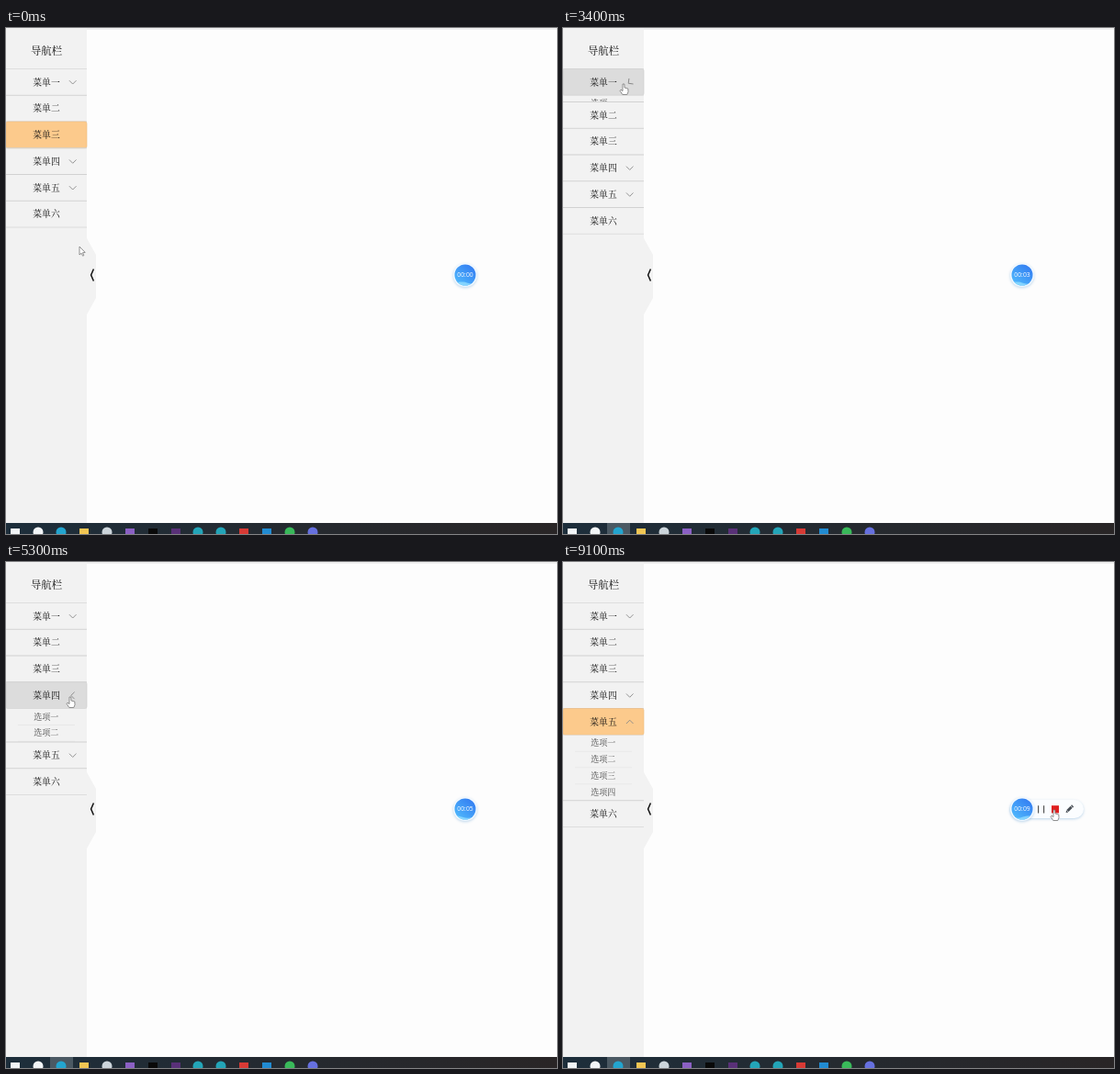
An HTML page with a canvas for the animation above (9.2 s loop, 600x551 px).

```html
<!DOCTYPE html>
<html lang="zh">
<head>
<meta charset="utf-8">
<style>
html, body { margin: 0; width: 100%; height: 100%; overflow: hidden; background: #fdfdfd; }
canvas { display: block; }
</style>
</head>
<body>
<canvas id="stage" width="600" height="551"></canvas>
<script>
const ctx = document.getElementById('stage').getContext('2d');
const LOOP = 9200, SLIDE = 300;
const SERIF = '"Noto Serif CJK SC", "Noto Serif SC", "Noto Sans CJK SC", serif';
const TOP = 44.5, ROW = 28.75, OPTION = 17.9, WIDTH = 88;
const DIGITS = '一二三四五六';

// Click times: [time, menu row]
const clicks = [[0, 2], [3313, 0], [4459, 1], [5150, 3], [6550, 4]];
const hasOptions = row => row === 0 || row === 3 || row === 4;

// Pointer path: [time, x, y]
const path = [
  [0, 80, 238], [700, 93, 264], [1150, 93, 266], [1950, 9.5, 265], [2330, 9.5, 265],
  [3200, 66, 61], [3650, 66, 61], [4350, 71, 171], [4650, 71, 171], [5080, 70, 147],
  [5350, 70, 147], [6000, 82.5, 227], [6120, 82.5, 227], [6420, 73, 246], [6750, 73, 246],
  [7100, 82, 236], [7220, 82, 236], [7500, 205, 234], [8000, 502, 266], [8500, 535, 270], [9200, 535, 270]
];

const clamp = v => Math.max(0, Math.min(1, v));
const ramp = (t, start, length = SLIDE) => clamp((t - start) / length);
const ease = p => p < .5 ? 4 * p ** 3 : 1 - 4 * (1 - p) ** 3;
const smooth = p => p * p * (3 - 2 * p);

function pointerAt(t) {
  const i = path.findIndex(k => k[0] > t);
  const [t0, x0, y0] = path[i - 1], [t1, x1, y1] = path[i];
  const p = smooth((t - t0) / (t1 - t0));
  return { x: x0 + (x1 - x0) * p, y: y0 + (y1 - y0) * p };
}

function rect(x, y, w, h, color, radius = 0) {
  ctx.fillStyle = color;
  ctx.beginPath();
  ctx.roundRect(x, y, w, h, radius);
  ctx.fill();
}

function disc(x, y, r, color) {
  ctx.fillStyle = color;
  ctx.beginPath();
  ctx.arc(x, y, r, 0, 7);
  ctx.fill();
}

function shape(points, fill, stroke, width = 1) {
  ctx.beginPath();
  points.forEach(([x, y]) => ctx.lineTo(x, y));
  if (fill) {
    ctx.closePath();
    ctx.fillStyle = fill;
    ctx.fill();
  }
  if (stroke) {
    ctx.strokeStyle = stroke;
    ctx.lineWidth = width;
    ctx.stroke();
  }
}

function label(text, x, y, size, color = '#111', family = SERIF) {
  ctx.font = `${size}px ${family}`;
  ctx.fillStyle = color;
  ctx.fillText(text, x, y);
}

function chevron(y, turn) {
  ctx.save();
  ctx.translate(72.7, y);
  ctx.rotate(turn * Math.PI);
  shape([[-3.8, -1.9], [0, 1.9], [3.8, -1.9]], null, '#888', .9);
  ctx.restore();
}

// How far a row's options have unfolded, linear 0..1
function unfolded(row, t) {
  const i = clicks.findIndex(c => c[1] === row);
  const next = clicks[i + 1];
  return { opening: ramp(t, clicks[i][0]), closing: next ? ramp(t, next[0]) : 0 };
}

function drawMenu(t, shift, pointer) {
  const active = clicks.filter(c => c[0] <= t).pop()[1];
  let hand = false;
  ctx.save();
  ctx.translate(-WIDTH * shift, 0);
  rect(0, 0, WIDTH, 539, '#f2f2f2');
  label('导航栏', 44, 25, 11.4);
  rect(0, TOP - .5, WIDTH, 1, '#dedede');

  let y = TOP;
  for (let row = 0; row < 6; row++) {
    const over = pointer.y > y && pointer.y < y + ROW && pointer.x < WIDTH * (1 - shift);
    hand ||= over;
    if (over || row === active) {
      rect(0, y, WIDTH, ROW, over ? '#dcdcdc' : '#fcca8c', 2);
      ctx.strokeStyle = over ? '#cfcfcf' : '#eebd80';
      ctx.lineWidth = .6;
      ctx.stroke();
    }
    label('菜单' + DIGITS[row], 44, y + 14.3, 9.8);
    let height = 0;
    if (hasOptions(row)) {
      const { opening, closing } = unfolded(row, t);
      height = 4 * OPTION * (ease(opening) - ease(closing));
      chevron(y + 14.6, opening - closing);
    }
    y += ROW;
    if (height > 0) {
      ctx.save();
      ctx.beginPath();
      ctx.rect(0, y, WIDTH, height);
      ctx.clip();
      rect(0, y - .5, WIDTH, 1, '#dedede');
      for (let i = 0; i < 4; i++) {
        label('选项' + DIGITS[i], 43.7, y + 8.6 + i * OPTION, 9, '#444');
        if (i < 3) rect(13, y + (i + 1) * OPTION - .5, 62, .8, '#e5e5e5');
      }
      ctx.restore();
      y += height;
    }
    rect(0, y - .5, WIDTH, 1, row < 5 ? '#d2d2d2' : '#dedede');
  }
  ctx.restore();
  return hand;
}

function drawHandle(shift, pointer) {
  const x = WIDTH - 86 * shift;
  shape([[x, 229], [x + 10, 247], [x + 10, 294], [x, 312]], '#f2f2f2');
  shape([[x + 7.4, 262.5], [x + 4.6, 269], [x + 7.4, 275.5]], null, '#111', 1.5);
  return pointer.x > x && pointer.x < x + 10 && pointer.y > 245 && pointer.y < 296;
}

function drawRecorder(t) {
  const open = smooth(ramp(t, 7950, 250));
  ctx.save();
  ctx.shadowColor = 'rgba(70,140,200,.35)';
  ctx.shadowBlur = 3;
  ctx.shadowOffsetY = 1;
  if (open) rect(487, 259, 26 + 54 * open, 20, '#fbfdff', 10);
  disc(500, 269, 13, '#f2f9ff');
  ctx.restore();

  if (open) {
    ctx.save();
    ctx.beginPath();
    ctx.rect(487, 255, 26 + 54 * open, 28);
    ctx.clip();
    rect(517, 265.2, 1.2, 8.2, '#555');
    rect(523, 265.2, 1.2, 8.2, '#555');
    rect(532, 265.2, 8, 8.2, '#e02020');
    ctx.translate(551.3, 269.2);
    ctx.rotate(-Math.PI / 4);
    rect(-2.6, -1.5, 6, 3, '#4a5058');
    rect(4, -1.5, 1.4, 3, '#4a5058');
    shape([[-3, -1.5], [-5.2, 0], [-3, 1.5]], '#4a5058');
    ctx.restore();
  }

  const blue = ctx.createLinearGradient(508, 260, 492, 279);
  blue.addColorStop(0, '#347ff2');
  blue.addColorStop(1, '#4fb8fc');
  disc(500, 269, 11.5, blue);
  ctx.save();
  ctx.clip();
  const wave = [[512, 282], [488, 282]];
  for (let x = 488; x <= 512; x += 2) {
    wave.push([x, 277.6 + 1.2 * Math.sin(x / 4 + t / 260)]);
  }
  shape(wave, 'rgba(150,225,255,.75)');
  ctx.restore();
  const seconds = Math.max(0, Math.floor((t - 180) / 990));
  label('00:0' + seconds, 500, 269.3, 6.8, '#fff', '"Open Sans", "Noto Sans", sans-serif');
}

function drawTaskbar(t) {
  const bar = ctx.createLinearGradient(0, 0, 600, 0);
  bar.addColorStop(0, '#1d2e3b');
  bar.addColorStop(.5, '#252a30');
  bar.addColorStop(1, '#292526');
  rect(0, 539, 600, 12, bar);
  if (t >= 900) rect(48, 539, 25, 12, '#4b5963');
  const squares = [[10, '#f2f5f7'], [85, '#f2c653'], [135, '#8b60c4'], [160, '#090909'],
    [185, '#593078'], [259, '#d83a35'], [284, '#218bd2']];
  const discs = [[35, '#f2f5f7'], [60, '#23a5cf'], [110, '#ccd5db'], [209, '#23a5b8'],
    [234, '#23a5b8'], [309, '#39b95a'], [334, '#6670df']];
  squares.forEach(([x, color]) => rect(x - 5, 545, 10, 8, color));
  discs.forEach(([x, color]) => disc(x, 549, 5.5, color));
}

function drawPointer({ x, y }, hand) {
  ctx.save();
  ctx.translate(x, y);
  ctx.lineJoin = 'round';
  if (hand) {
    shape([[-1, 0], [.8, 0], [1, 4], [4.8, 5], [5, 8.5], [3.8, 11.5], [-1.2, 11.5],
      [-4, 7.2], [-3, 6.2], [-1, 7.6]], '#fff', '#777', .8);
  } else {
    shape([[0, 0], [0, 9], [2.1, 7.2], [3.6, 10.2], [4.8, 9.6], [3.5, 6.7], [6.2, 6.4], [0, 0]],
      '#fff', '#777', .8);
  }
  ctx.restore();
}

function draw(now) {
  const t = now % LOOP;
  const pointer = pointerAt(t);
  const shift = ease(ramp(t, 900)) - ease(ramp(t, 2203));
  ctx.textAlign = 'center';
  ctx.textBaseline = 'middle';
  rect(0, 0, 600, 551, '#fdfdfd');
  rect(0, 0, 600, 2, '#f0f0f0');
  const overHandle = drawHandle(shift, pointer);
  const overRow = drawMenu(t, shift, pointer);
  drawRecorder(t);
  drawTaskbar(t);
  drawPointer(pointer, overHandle || overRow || t > 7950);
  requestAnimationFrame(frame);
}

const start = performance.now();
function frame() {
  draw(performance.now() - start);
}
frame();
</script>
</body>
</html>
```
